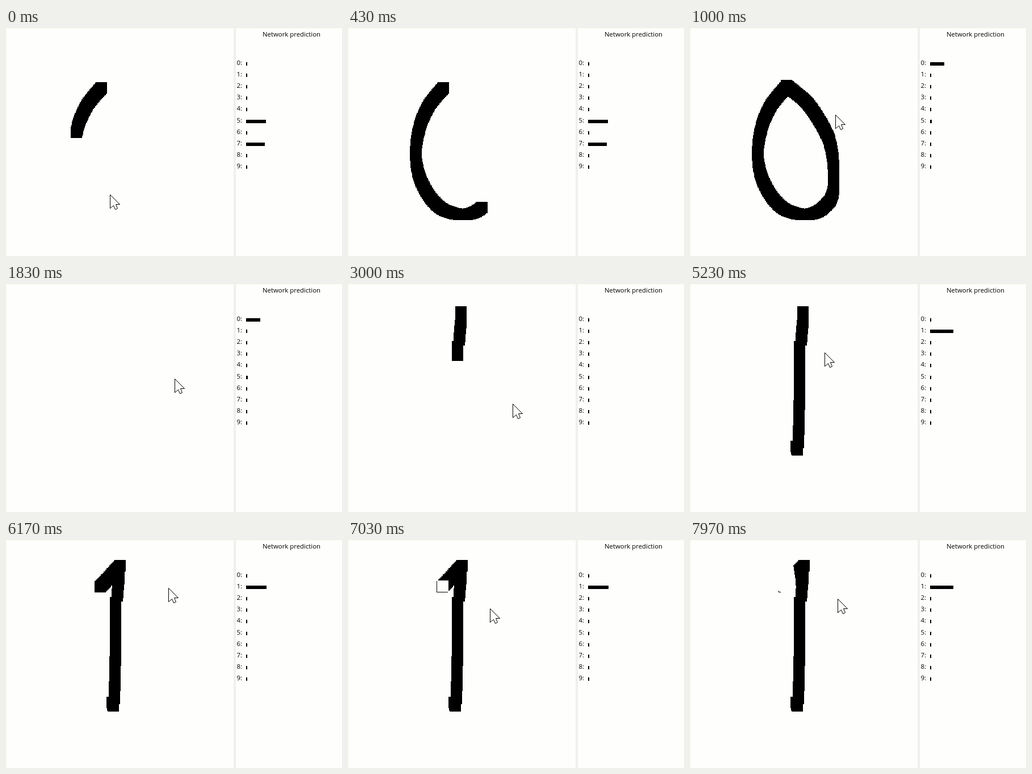
Recreate the animation shown at these times as an HTML page with a canvas. Size 592 px wide and 400 px high, loop 8000 ms.

```html
<!DOCTYPE html>
<html lang="en">
<head>
<meta charset="utf-8">
<title>Digit recognition</title>
<style>
  html, body { margin: 0; width: 100%; height: 100%; overflow: hidden; background: #fefefc; }
  canvas { display: block; }
</style>
</head>
<body>
<canvas id="stage" width="592" height="400"></canvas>
<script>
const ctx = document.getElementById('stage').getContext('2d');
const LOOP = 8000, CLEAR_AT = 1500;
const PAPER = '#fefefc', EDGE = '#f8f8e8', DIVIDER = '#f0f0ee', INK = '#000';
const BRUSH = 20, SPACING = 3;
// The pointer runs slightly ahead of the ink and in 1.5x screen coordinates.
const LEAD = 22, POINTER_SCALE = 1.5;

const strokes = [
  // zero
  stroke(-189, 945, INK, [[168, 105], [141, 139], [124, 183], [120, 232], [134, 280], [167, 318],
    [214, 326], [248, 300], [253, 252], [247, 203], [229, 164], [203, 128], [170, 101]]),
  // one: stem, foot, flag
  stroke(2870, 2970, INK, [[199, 49], [199, 63], [196, 98]]),
  stroke(2970, 3191, INK, [[193, 110], [193, 185], [191, 278]]),
  stroke(3191, 3220, INK, [[187, 285], [189, 291]]),
  stroke(5350, 5700, INK, [[166, 82], [201, 45]]),
  // rubbing the flag out
  stroke(7028, 7965, PAPER, [[167, 81], [162, 72], [176, 88], [171, 46], [173, 69]])
];

// Pointer keys: both ends of each stroke and two places where it pauses
const pointerKeys = [
  ...strokes.flatMap(s => [0, 1].map(u => ({ time: mix(s.start, s.end, u) - LEAD, at: toScreen(curve(s.path, u)) }))),
  { time: 1830, at: [297, 166] },
  { time: 5230, at: [237, 120] },
  { time: LOOP, at: [260, 103] }
].sort((a, b) => a.time - b.time);

// Bar widths by digit, from the given time on
const predictions = [
  { from: 0, bars: { 5: 35, 7: 33 } },
  { from: 600, bars: { 0: 25, 5: 3 } },
  { from: 2870, bars: {} },
  { from: 3200, bars: { 1: 41 } },
  { from: 5600, bars: { 1: 36 } },
  { from: 7400, bars: { 1: 41 } }
];

function stroke(start, end, color, path) {
  const length = path.slice(1).reduce((sum, p, i) => sum + Math.hypot(p[0] - path[i][0], p[1] - path[i][1]), 0);
  return { start, end, color, path, stamps: Math.ceil(length / SPACING) };
}

function mix(a, b, k) { return a + (b - a) * k; }
function toScreen(point) { return point.map(v => v * POINTER_SCALE); }
function progress(s, t) { return Math.min(1, (t - s.start) / (s.end - s.start)); }

// Catmull-Rom spline through the path, u from 0 to 1
function curve(path, u) {
  const last = path.length - 1;
  const i = Math.min(last - 1, Math.floor(u * last)), k = u * last - i;
  const [a, b, c, d] = [i - 1, i, i + 1, i + 2].map(n => path[Math.max(0, Math.min(last, n))]);
  return [0, 1].map(n => b[n] + k / 2 * (c[n] - a[n]
    + k * (2 * a[n] - 5 * b[n] + 4 * c[n] - d[n] + k * (3 * (b[n] - c[n]) + d[n] - a[n]))));
}

function stamp([x, y]) {
  ctx.fillRect(Math.round(x - BRUSH / 2), Math.round(y - BRUSH / 2), BRUSH, BRUSH);
}

function drawStrokes(t) {
  for (const s of strokes) {
    if (t < s.start || (t >= CLEAR_AT && s.end < CLEAR_AT)) continue;
    const done = progress(s, t);
    ctx.fillStyle = s.color;
    for (let i = 0; i < done * s.stamps; i++) stamp(curve(s.path, i / s.stamps));
    stamp(curve(s.path, done));
  }
}

function pointerAt(t) {
  const ahead = t + LEAD;
  const active = strokes.find(s => ahead >= s.start && ahead < s.end);
  if (active) return toScreen(curve(active.path, progress(active, ahead)));
  const next = pointerKeys.findIndex(key => key.time > t);
  const a = pointerKeys[next - 1], b = pointerKeys[next];
  const k = (t - a.time) / (b.time - a.time), eased = k * k * (3 - 2 * k);
  return [0, 1].map(n => mix(a.at[n], b.at[n], eased));
}

function drawPointer(t) {
  const [x, y] = pointerAt(t).map(Math.round);
  const outline = [[0, 0], [0, 24], [6, 19], [9, 26], [13, 24], [10, 17], [17, 17]];
  ctx.beginPath();
  for (const [dx, dy] of outline) ctx.lineTo(x + dx + 0.5, y + dy + 0.5);
  ctx.closePath();
  ctx.fillStyle = PAPER;
  ctx.fill();
  ctx.strokeStyle = INK;
  ctx.stroke();
}

function drawPanel(t) {
  const { bars } = predictions.filter(p => p.from <= t).pop();
  ctx.fillStyle = INK;
  ctx.font = '11.4px "Open Sans", sans-serif';
  ctx.textAlign = 'center';
  ctx.fillText('Network prediction', 503, 15);
  ctx.textAlign = 'left';
  for (let digit = 0; digit < 10; digit++) {
    const y = Math.round(digit * 20.1);
    ctx.fillText(digit + ':', 406.5, 65 + y);
    ctx.fillRect(423, 60 + y, bars[digit] || 2, 6);
  }
}

function draw(t) {
  ctx.fillStyle = PAPER;
  ctx.fillRect(0, 0, 592, 400);
  ctx.fillStyle = EDGE;
  ctx.fillRect(0, 0, 592, 1);
  ctx.fillRect(0, 0, 1, 400);
  ctx.fillStyle = DIVIDER;
  ctx.fillRect(401, 0, 4, 400);
  drawStrokes(t);
  drawPanel(t);
  drawPointer(t);
}

const begin = performance.now();
function tick() {
  draw((performance.now() - begin) % LOOP);
  requestAnimationFrame(tick);
}
tick();
</script>
</body>
</html>
```
